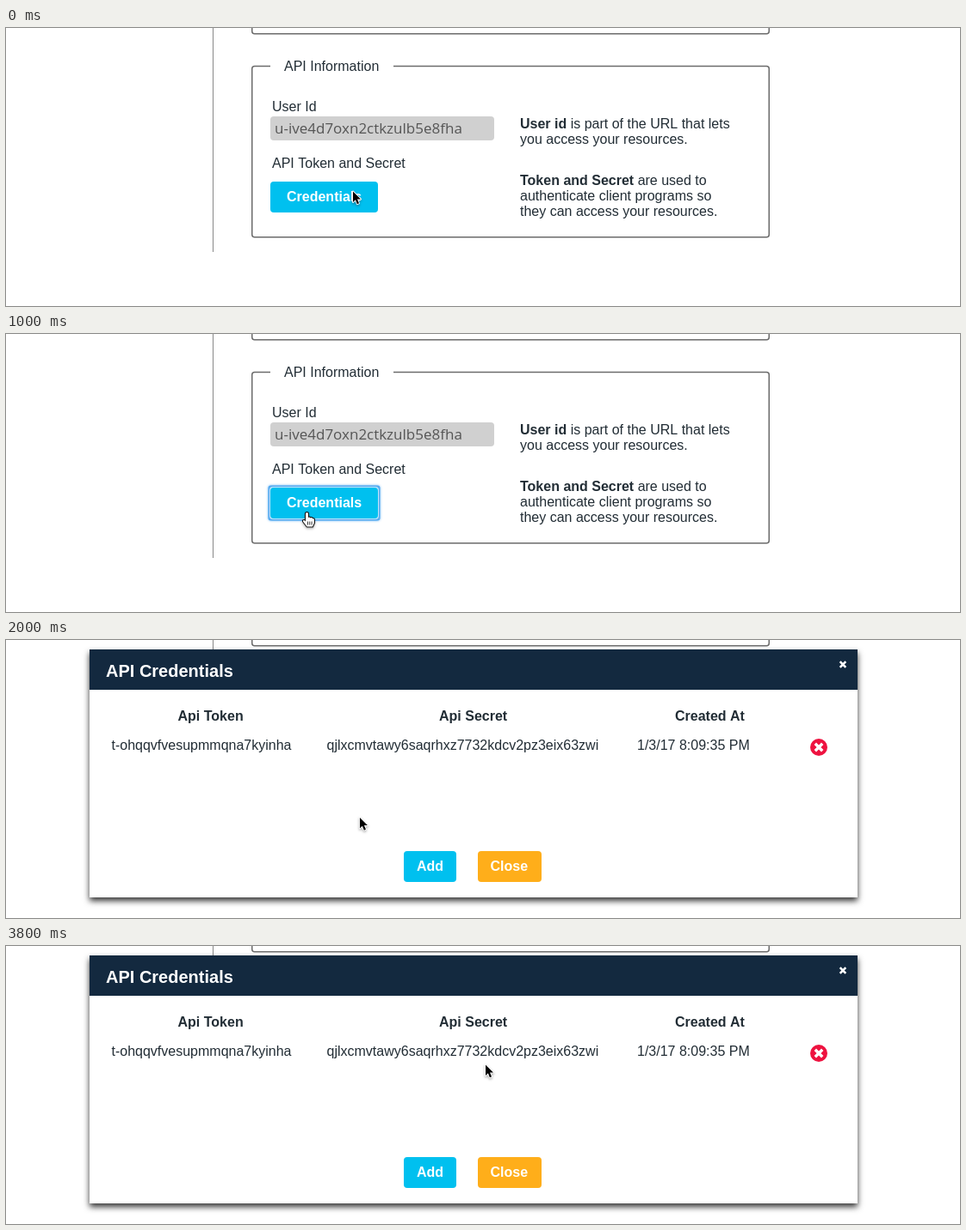
An HTML page with a canvas that plays this animation: 1108x324 px, repeating every 3.9 s.

```html
<!DOCTYPE html>
<html lang="en">
<head>
<meta charset="utf-8">
<title>API credentials</title>
<style>
  html, body { margin: 0; width: 100%; height: 100%; overflow: hidden; background: #fff; }
  canvas { display: block; }
</style>
</head>
<body>
<canvas id="stage" width="1108" height="324"></canvas>
<script>
const ctx = document.getElementById('stage').getContext('2d');
const LOOP = 3900, STEP = 100;
const CLICK = 1000, SPIN = 1100, MODAL = 1500;
const INK = '#222d35', BLUE = '#00c0ef', SANS = '"Liberation Sans", Arial, sans-serif';

// Pointer path: time, x, y
const PATH = [
  [0, 403, 190], [500, 356, 208], [600, 356, 208], [800, 352, 217],
  [1000, 350, 208], [1500, 349, 207], [1800, 349, 207],
  [2400, 588, 205], [2500, 588, 205], [3000, 557, 138]
];

function text(str, x, y, { bold = false, size = 16, color = INK, family = SANS } = {}) {
  ctx.font = `${bold ? 'bold ' : ''}${size}px ${family}`;
  ctx.fillStyle = color;
  ctx.fillText(str, x, y);
  return x + ctx.measureText(str).width;
}

function box(x, y, w, h, r, color) {
  ctx.beginPath();
  ctx.roundRect(x, y, w, h, r);
  ctx.fillStyle = color;
  ctx.fill();
}

function button(label, x, y, w, textX, color) {
  box(x, y, w, 36, 4, color);
  text(label, textX, y + 23, { bold: true, color: '#fff' });
}

function cross(x, y, r, width) {
  ctx.beginPath();
  ctx.moveTo(x - r, y - r);
  ctx.lineTo(x + r, y + r);
  ctx.moveTo(x + r, y - r);
  ctx.lineTo(x - r, y + r);
  ctx.lineWidth = width;
  ctx.strokeStyle = '#fff';
  ctx.stroke();
}

function frame(y, h) {
  ctx.beginPath();
  ctx.roundRect(285.75, y, 600.5, h, 3);
  ctx.lineWidth = 1.5;
  ctx.strokeStyle = '#6b6b6b';
  ctx.stroke();
}

function drawPage(t) {
  ctx.fillStyle = '#888';
  ctx.fillRect(240, 0, 1, 261);
  frame(-60, 66.75);
  frame(44.5, 199.25);
  ctx.fillStyle = '#fff';
  ctx.fillRect(307, 40, 143, 10);
  text('API Information', 323, 50);

  text('User Id', 309, 97);
  box(307, 103, 260, 28, 4, '#d0d0d0');
  text('u-ive4d7oxn2ctkzulb5e8fha', 312, 123,
    { size: 17, color: '#555', family: '"Open Sans", "Noto Sans", sans-serif' });
  text('API Token and Secret', 309, 163);

  let x = text('User id', 597, 117, { bold: true });
  text(' is part of the URL that lets', x, 117);
  text('you access your resources.', 597, 135);
  x = text('Token and Secret', 597, 183, { bold: true });
  text(' are used to', x, 183);
  text('authenticate client programs so', 597, 201);
  text('they can access your resources.', 597, 219);

  if (t >= CLICK) drawFocus();
  button('Credentials', 307, 179, 125, 326, BLUE);
  if (t >= SPIN) drawSpinner(t);
}

function drawFocus() {
  ctx.save();
  ctx.shadowColor = '#6cb5f4';
  ctx.shadowBlur = 3;
  box(304.5, 176.5, 130, 41, 3, '#55aaf0');
  ctx.restore();
  box(306, 178, 127, 38, 4, '#c5e5fb');
}

function drawSpinner(t) {
  const head = 4 + (t - 1400) / STEP;
  ctx.lineCap = 'round';
  ctx.lineWidth = 3.2;
  for (let i = 0; i < 12; i++) {
    const age = ((i - head) % 12 + 12) % 12;
    const k = Math.min(1, age / 6);
    ctx.strokeStyle = `rgb(${10 * k}, ${12 + 128 * k}, ${20 + 150 * k})`;
    ctx.save();
    ctx.translate(482, 185);
    ctx.rotate(i * Math.PI / 6);
    ctx.beginPath();
    ctx.moveTo(0, -10);
    ctx.lineTo(0, -14.5);
    ctx.stroke();
    ctx.restore();
  }
  ctx.lineCap = 'butt';
}

function drawModal() {
  ctx.save();
  ctx.shadowColor = 'rgba(0, 0, 0, 0.8)';
  ctx.shadowBlur = 7;
  ctx.shadowOffsetY = 4;
  box(97, 11, 892, 289, 0, '#fff');
  ctx.restore();
  box(97, 11, 892, 47, 0, '#13293f');
  text('API Credentials', 116, 43, { bold: true, size: 20, color: '#fff' });
  cross(972, 28.5, 3.3, 2.6);

  text('Api Token', 199.5, 94, { bold: true });
  text('Api Secret', 503, 94, { bold: true });
  text('Created At', 777, 94, { bold: true });
  text('t-ohqqvfvesupmmqna7kyinha', 122.5, 128);
  text('qjlxcmvtawy6saqrhxz7732kdcv2pz3eix63zwi', 372.5, 128);
  text('1/3/17 8:09:35 PM', 733, 128);

  box(934, 115, 20, 20, 10, '#ee1340');
  cross(944, 125, 4.2, 3.4);
  button('Add', 462, 246, 61, 477, BLUE);
  button('Close', 548, 246, 74, 562.5, '#ffae1a');
}

function shape(path, fill, line, width) {
  const p = new Path2D(path);
  ctx.save();
  ctx.shadowColor = 'rgba(0, 0, 0, 0.35)';
  ctx.shadowBlur = 3;
  ctx.shadowOffsetY = 1.5;
  ctx.lineJoin = 'round';
  ctx.lineWidth = width;
  ctx.strokeStyle = line;
  ctx.stroke(p);
  ctx.restore();
  ctx.fillStyle = fill;
  ctx.fill(p);
}

function pointerAt(t) {
  const i = PATH.findIndex(p => p[0] > t);
  if (i < 0) return PATH[PATH.length - 1].slice(1);
  const [t0, x0, y0] = PATH[i - 1], [t1, x1, y1] = PATH[i];
  const u = (t - t0) / (t1 - t0), k = u * u * (3 - 2 * u);
  return [x0 + (x1 - x0) * k, y0 + (y1 - y0) * k];
}

function drawPointer(t) {
  const [x, y] = pointerAt(t);
  ctx.save();
  ctx.translate(x, y);
  if (t >= CLICK && t < MODAL) {
    shape('M-2 1.5Q-2 0 -.5 0T1 1.5V6Q2.5 5 3.5 6.5Q5 5.5 6 7Q8 6.5 8 9V12L6 16.5H-.5L-5 10.5Q-5.5 8.5 -3.5 9L-2 10.5Z',
      '#fff', '#111', 2);
    ctx.fillStyle = '#222';
    for (const dx of [0, 2.3, 4.6]) ctx.fillRect(dx, 10.5, 0.9, 4);
  } else {
    shape('M0 .5V13L2.9 10.3L4.9 15.2L7 14.3L5 9.6H9Z', '#000', '#fff', 1.8);
  }
  ctx.restore();
}

function draw(now) {
  const t = Math.floor((now % LOOP) / STEP) * STEP;
  ctx.fillStyle = '#fff';
  ctx.fillRect(0, 0, 1108, 324);
  drawPage(t);
  if (t >= MODAL) drawModal();
  drawPointer(t);
}

const start = performance.now();
function tick() {
  draw(performance.now() - start);
  requestAnimationFrame(tick);
}
tick();
</script>
</body>
</html>
```
